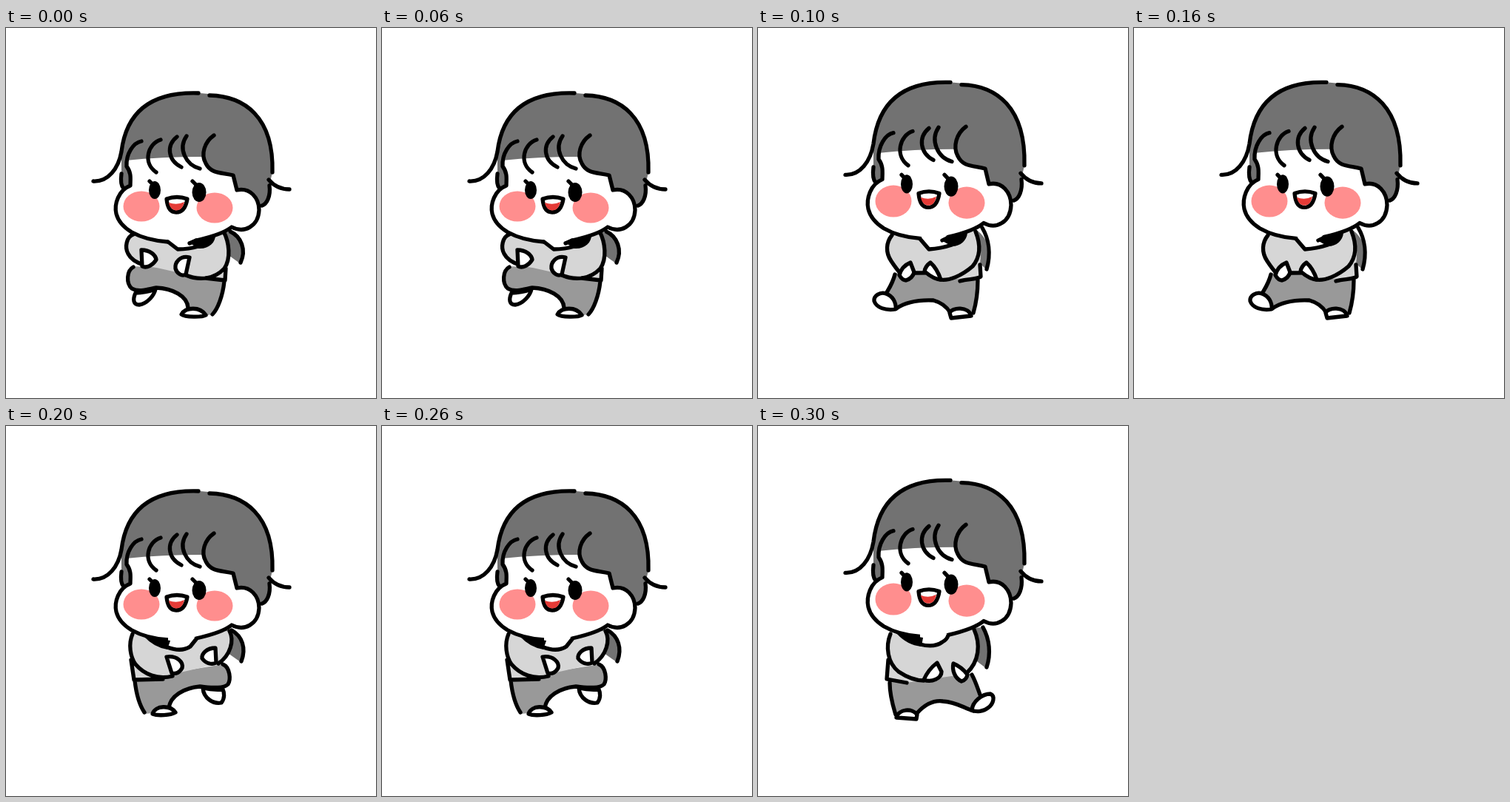
An HTML page for the animation above (0.4 s loop, 500x500 px).

```html
<!DOCTYPE html>
<html lang="en">
<head>
<meta charset="utf-8">
<title>Dancing child</title>
<style>
  html, body { margin: 0; width: 100%; height: 100%; overflow: hidden; background: #fff; }
  svg { display: block; width: 100vw; height: 100vh; }
  path { fill: none; vector-effect: non-scaling-stroke; }
  .line, .white { stroke: #000; stroke-width: 5.3; stroke-linecap: round; stroke-linejoin: round; }
  .white, .skin { fill: #fff; }
  .hair { fill: #727272; }
  .shirt { fill: #d6d6d6; }
  .pants { fill: #999; }
  .blush { fill: #ff8e8e; }
  .tongue { fill: #e53b37; }
  .ink { fill: #000; }
  .pose { display: none; }
</style>
</head>
<body>
<svg viewBox="0 0 500 500">
  <defs>
    <g id="head">
      <path class="hair" d="M156 167C163 110 200 86 262 88C322 92 362 120 360 195L356 212C357 228 352 238 340 243L300 250L168 213L158 217C153 212 154 204 156 197Z"/>
      <path class="skin" d="M162 179Q210 174 265 174C272 198 290 195 307 199L312 219C330 215 342 230 342 246C341 268 322 278 305 269C295 277 275 283 257 287L250 291L232 293L219 289Q190 287 170 276C144 260 140 224 168 214C168 205 170 196 163 188Z"/>
      <ellipse class="blush" cx="183" cy="241" rx="24.5" ry="20.5"/>
      <ellipse class="blush" cx="282" cy="243" rx="24.5" ry="20.5"/>
      <ellipse cx="201" cy="219" rx="8" ry="12"/>
      <ellipse cx="261" cy="222" rx="9.5" ry="13"/>
      <path class="white" d="M217 231Q231 226 245 231C243 243 238 249 230 249C222 249 218 242 217 231Z"/>
      <path class="tongue" d="M220 236Q231 240 241 235C239 243 236 246.4 230 246.4C225 246.4 221 242 220 236Z"/>
      <path class="line" d="M118 207C138 208 152 190 156 167C163 110 200 86 260 88
        M275 91C322 92 362 120 360 195M355 205Q366 218 383 218M356 213C358 228 352 238 346 240
        M156 197Q154 212 159 217
        M183 153C172 155 162 170 163 187C170 196 168 205 168 213C152 219 146 238 149 251C152 263 160 270 170 276Q190 287 219 289
        M209 151C192 156 184 182 203 195M231 147C216 159 219 179 237 188M244 146C232 163 243 185 262 190
        M281 145C268 154 263 171 270 183C277 197 290 195 307 199L312 219C330 215 342 230 342 246C341 268 322 278 305 269C295 277 275 283 257 287
        M194 207L199 212M252 207L257 212"/>
    </g>
  </defs>

  <g class="pose">
    <path class="hair" d="M296 275C315 280 325 298 316 318L298 305Z"/>
    <path class="line" d="M303 275C318 282 325 300 317 317"/>
    <path class="pants" d="M172 322C163 328 162 345 170 352C180 358 195 352 203 351C225 352 245 362 246 378L272 388L279 387C287 380 293 362 296 341L240 325Z"/>
    <path class="shirt" d="M172 279C163 282 160 296 165 305C169 313 176 317 186 320L235 331L296 341L297 323C304 310 302 290 292 275Z"/>
    <path class="line" d="M172 279C163 282 160 296 165 305C169 313 176 317 186 320M294 275C302 290 304 312 295 325C282 339 262 342 243 334M297 325L296 341L270 338
      M172 323C163 328 162 345 170 352C180 358 195 352 203 351C225 352 245 362 246 378M295 342C293 362 286 380 279 387"/>
    <path class="white" d="M183 300C195 300 202 307 203 313C198 321 190 325 184 322Z"/>
    <path class="white" d="M248 310C235 307 228 317 229 325C231 332 238 336 243 333Z"/>
    <path class="white" d="M175 358C171 367 172 374 180 374C190 373 200 362 202 353Q188 358 175 358Z"/>
    <path class="white" d="M237 387C243 377 262 376 270 388C265 391 242 391 237 387Z"/>
    <use href="#head"/>
    <path class="skin" d="M219 286L255 286L262 294L232 299Z"/>
    <path class="line" d="M219 289L232 299Q247 299 260 295M257 287L248 291"/>
    <path class="ink" d="M246 289L283 280C283 290 274 299 260 298Z"/>
  </g>

  <g class="pose">
    <path class="hair" d="M294 272C313 285 317 307 309 327L298 316Z"/>
    <path class="line" d="M303 270C312 285 315 305 309 326"/>
    <path class="pants" d="M185 331C182 345 177 352 173 359L186 379C200 370 215 367 237 368C248 372 256 378 260 386L291 386Q297 360 297 339Z"/>
    <path class="shirt" d="M181 280C173 290 172 303 180 315L194 331L226 331L248 340L301 337L300 318C303 300 300 285 294 275Z"/>
    <path class="line" d="M181 280C173 290 172 303 180 315Q188 327 193 332M211 331L226 331M294 275C302 295 300 310 290 322C275 335 258 342 246 340M300 320L301 336C295 340 285 339 273 342
      M185 333C182 345 177 352 173 359M187 379C200 370 215 367 237 368C248 371 256 378 260 385M297 341Q297 364 291 385"/>
    <path class="white" d="M206 317Q194 322 191 334Q195 341 200 341Q209 338 211 330Z"/>
    <path class="white" d="M233 317Q226 322 225 329C231 334 239 340 247 340Q242 325 233 317Z"/>
    <path class="white" d="M173 359C165 356 156 362 157 369C160 378 172 382 186 380C187 371 182 362 173 359Z"/>
    <path class="white" d="M259 385C262 377 285 376 288 389L261 392Z"/>
    <use href="#head" transform="matrix(1 0 0 1.05 0 -19)"/>
    <path class="skin" d="M219 283L255 283L262 294L231 299Z"/>
    <path class="line" d="M219 285L231 299Q247 298 262 293M257 283L249 287"/>
    <path class="ink" d="M246 286L283 277C282 287 274 295 262 295Z"/>
  </g>

  <g class="pose">
    <path class="hair" d="M296 275C317 280 326 298 317 319L300 307Z"/>
    <path class="line" d="M305 276C319 284 325 300 318 318"/>
    <path class="pants" d="M173 342C176 362 181 378 187 389L198 388L220 381C222 365 240 354 262 352C275 353 293 356 300 349C304 343 303 326 293 322Z"/>
    <path class="shirt" d="M171 281C165 295 167 312 170 320L173 343L200 343L240 332L288 321C303 310 309 290 302 277Z"/>
    <path class="line" d="M171 281C165 295 168 312 175 322C187 336 205 343 225 338M169 316L173 343L212 342M302 277C309 290 303 310 287 321
      M174 344C176 362 181 378 187 387M293 322C303 326 304 343 300 349C293 356 275 353 262 352C240 354 222 365 220 381"/>
    <path class="white" d="M217 312C231 310 240 319 238 327C234 334 230 335 224 334Z"/>
    <path class="white" d="M283 300C271 300 264 308 265 314C270 321 278 323 284 320Z"/>
    <path class="white" d="M198 389C202 377 222 377 229 387C222 391 205 392 198 389Z"/>
    <path class="white" d="M266 354C267 368 280 376 291 374C296 368 295 360 293 356Q279 357 266 354Z"/>
    <use href="#head"/>
    <path class="skin" d="M219 286L258 286L250 297Q235 303 219 299Z"/>
    <path class="line" d="M218 299Q237 306 249 298L257 288"/>
    <path class="ink" d="M187 285L222 290L218 302Q200 299 187 285Z"/>
  </g>

  <g class="pose">
    <path class="hair" d="M292 273L304 272C315 287 317 310 309 328L296 318Z"/>
    <path class="line" d="M304 272C313 288 315 308 309 326"/>
    <path class="pants" d="M178 345C178 365 183 380 187 391L215 388C224 378 235 370 250 372C268 373 278 381 291 385L300 363Q296 346 289 335Z"/>
    <path class="shirt" d="M179 281C172 298 175 308 176 315L174 342L200 347L282 335C299 318 301 295 292 275Z"/>
    <path class="line" d="M179 281C172 298 175 320 190 332C202 340 213 344 224 344M176 316L174 342L201 347M292 275C301 295 299 318 282 334
      M178 347C178 365 183 380 186 390M215 388C224 378 235 370 250 372C268 373 278 381 291 385M289 336C294 345 297 355 300 363"/>
    <path class="white" d="M242 320Q230 329 224 343C235 347 248 341 248 332Z"/>
    <path class="white" d="M264 321C262 330 266 341 275 345Q282 343 283 336Q276 326 264 321Z"/>
    <path class="white" d="M187 394C190 382 209 381 215 390L214 396Z"/>
    <path class="white" d="M289 384C290 372 303 362 314 362C321 365 318 375 312 380C305 386 295 387 289 384Z"/>
    <use href="#head" transform="matrix(1 0 0 1.05 0 -19)"/>
    <path class="skin" d="M219 281L258 281L252 293Q237 300 219 295Z"/>
    <path class="line" d="M219 295Q238 300 249 292Q255 289 257 283"/>
    <path class="ink" d="M187 280L223 286L221 298Q201 296 187 280Z"/>
  </g>
</svg>
<script>
  const STEP = 100;
  const poses = [...document.querySelectorAll(".pose")];

  function draw(now) {
    const current = Math.floor(now / STEP) % poses.length;
    poses.forEach((pose, i) => { pose.style.display = i === current ? "inline" : "none"; });
    requestAnimationFrame(() => draw(performance.now() - start));
  }

  const start = performance.now();
  draw(0);
</script>
</body>
</html>
```
